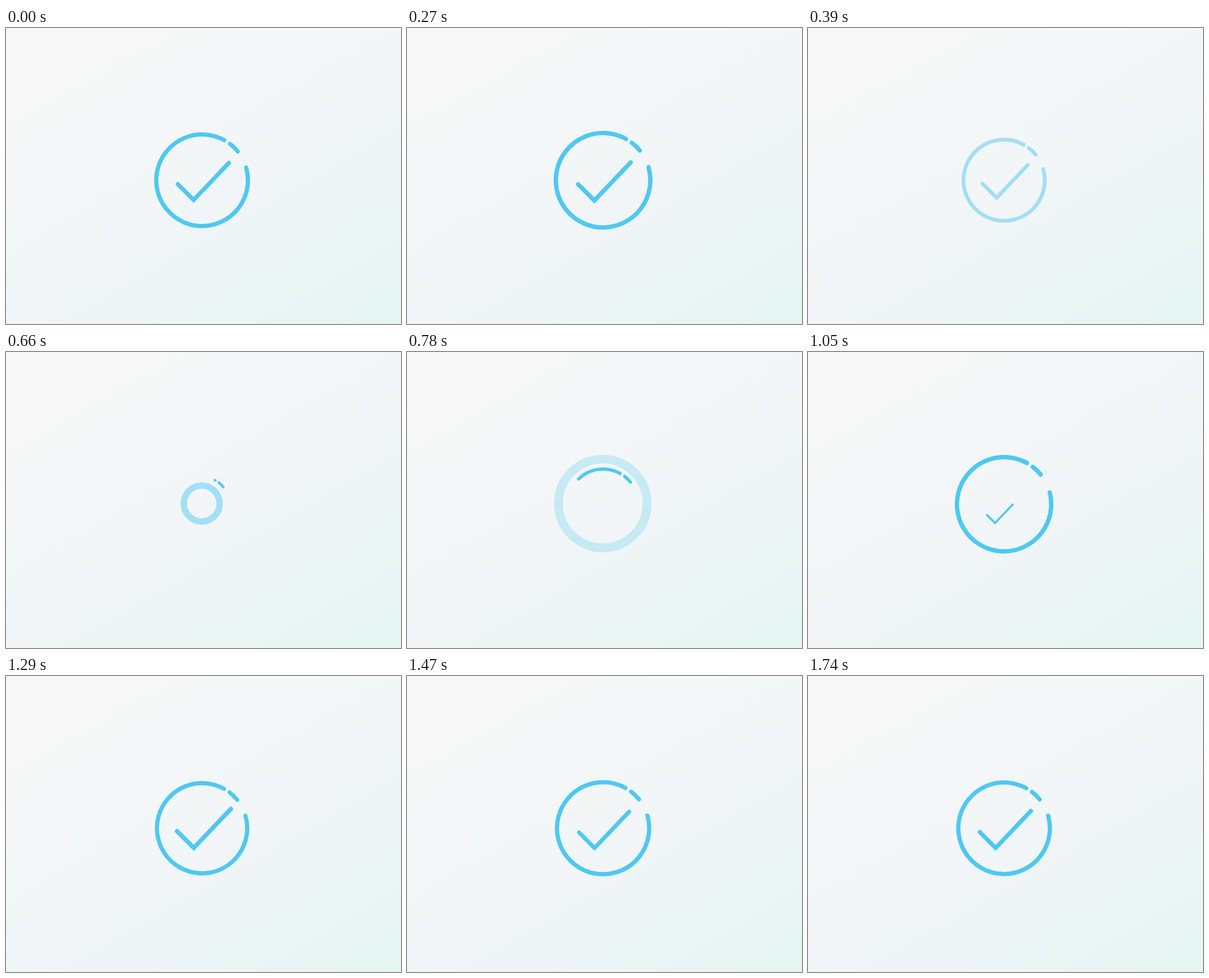
Recreate the animation shown at these times as an HTML page. Size 560 px wide and 420 px high, loop 1770 ms.

```html
<!DOCTYPE html>
<html>
<head>
<meta charset="utf-8">
<style>
html, body { margin: 0; width: 100%; height: 100%; overflow: hidden; }
body { background: linear-gradient(150deg, #f8f8f8 15%, #f0f5f7 60%, #e5f5f2 100%); }
svg { display: block; fill: none; stroke: #4fc8f0; stroke-width: 6; stroke-linecap: round; }
</style>
</head>
<body>
<svg width="560" height="420" viewBox="0 0 560 420">
  <circle id="pulse" cx="277.5" cy="215"/>
  <g id="icon">
    <path id="arc"/>
    <path id="dash"/>
    <path id="tick" d="M-34.5 5.5L-12 28L38 -24.5"/>
  </g>
</svg>
<script>
const LOOP = 1770, RADIUS = 65;
const [pulse, icon, arc, dash, tick] =
  ['pulse', 'icon', 'arc', 'dash', 'tick'].map(id => document.getElementById(id));

const progress = (t, from, to) => Math.min(1, Math.max(0, (t - from) / (to - from)));
const mix = (a, b, p) => a + (b - a) * p;
const set = (el, attrs) => {
  for (const key in attrs) el.setAttribute(key, attrs[key]);
};

// Counterclockwise arc; angles in degrees, 0 pointing right
function arcPath(start, sweep) {
  const point = deg => {
    const a = deg * Math.PI / 180;
    return `${RADIUS * Math.cos(a)} ${RADIUS * Math.sin(a)}`;
  };
  return `M${point(start)}A${RADIUS} ${RADIUS} 0 ${+(sweep > 180)} 0 ${point(start - sweep)}`;
}

// Rises past 1 by `over`, then settles in damped swings
function spring(t, start, peak, from, over) {
  if (t < peak) return mix(from, 1 + over, 1 - (1 - progress(t, start, peak)) ** 1.5);
  const swing = (t - peak) / 200;
  return 1 + over * Math.exp(-1.1 * swing) * Math.cos(Math.PI * swing);
}

function drawPulse(t) {
  const p = progress(t, 600, 900);
  const eased = 1 - (1 - p) ** 2;
  const outer = 82 * eased;
  const width = Math.min(outer, 6.5 + 7 * eased);
  set(pulse, {
    r: outer - width / 2,
    'stroke-width': width,
    opacity: p > 0 && p < 1 ? 0.6 - 0.55 * p : 0
  });
}

function draw(t) {
  let scale, opacity = 1, drawn = 1, tickScale = 1;
  if (t < 600) {
    const fade = progress(t, 330, 450);
    scale = t < 330 ? mix(1, 1.09, progress(t, 240, 330)) : mix(1.09, 0.69, fade);
    opacity = 1 - fade;
  } else {
    scale = spring(t, 600, 1100, 0.5, 0.045);
    drawn = (1 - Math.cos(Math.PI * progress(t, 645, 1070))) / 2;
    tickScale = spring(t, 950, 1260, 0, 0.09);
  }
  set(icon, { transform: `translate(278 216) scale(${scale})`, opacity });
  set(arc, { d: arcPath(-61, Math.max(0.1, 315 * drawn)) });
  set(tick, {
    transform: `translate(-13 24) scale(${tickScale}) translate(13 -24)`,
    opacity: tickScale > 0 ? 1 : 0
  });
  drawPulse(t);
}

set(dash, { d: arcPath(-39, 13.5) });
const begin = performance.now();
function frame() {
  draw((performance.now() - begin) % LOOP);
  requestAnimationFrame(frame);
}
frame();
</script>
</body>
</html>
```
